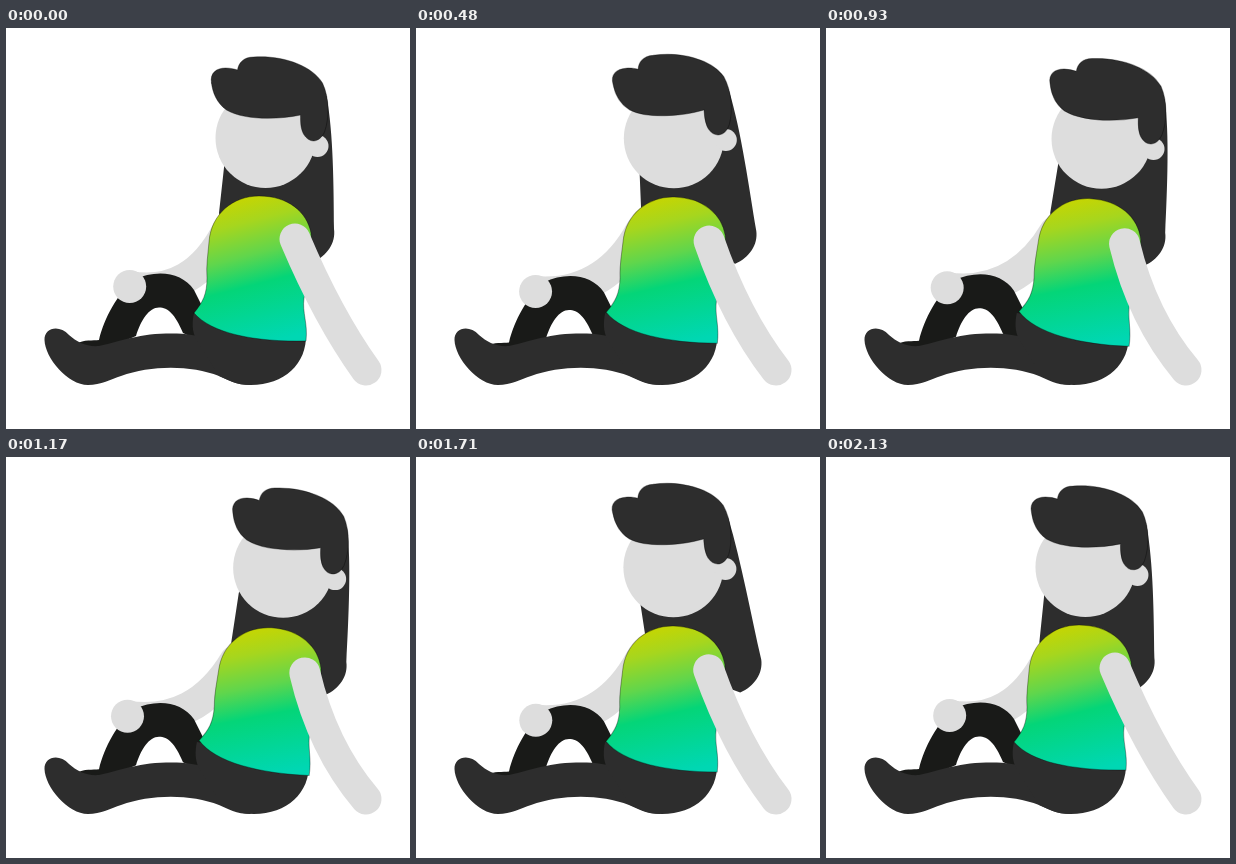
Animation of 404 by 401 pixels, one loop 2160 ms. Source, as an HTML page with a canvas:

```html
<!DOCTYPE html>
<html lang="en">
<head>
<meta charset="utf-8">
<title>Sitting figure</title>
<style>
html, body { margin: 0; width: 100%; height: 100%; overflow: hidden; background: #fff; }
canvas { display: block; width: 404px; height: 401px; }
</style>
</head>
<body>
<canvas id="stage"></canvas>
<script>
const W = 404, H = 401, LOOP = 2160, STEP = 30;
const HAIR = '#2d2d2d', SKIN = '#dddddd', FAR_LEG = '#191a18', EDGE = 'rgba(0,0,0,.35)';
const canvas = document.getElementById('stage');
const ctx = canvas.getContext('2d');
const dpr = window.devicePixelRatio || 1;
canvas.width = W * dpr;
canvas.height = H * dpr;

const rad = deg => deg * Math.PI / 180;

const farLeg = new Path2D('M70 316C78 311 87 313 93 312C98 290 112 265 128 252C150 241 176 244 188 262L199 284L192 312L177 305C169 286 162 279.500 153 279.500C143 279.500 135 292 130 308L95 323Z');
const nearLeg = new Path2D('M38.500 312C38 300 53 296 63 307C71 314 80 319 93 318C110 315 130 306 160 305.500C178 305 190 307 204 311L245 357C230 357 222 352 213 348C185 337 145 337 115 348C105 351 95 357 82 357C62 357 39 330 38.500 312Z');
const hips = new Path2D('M188 285L300 306C301 336 278 357 245 357C230 357 222 352 213 348L190 311C186 303 186 294 188 285Z');
const shirt = new Path2D('M188 285C197 274 201 266 201 250C200 238 202 226 203 214C205 186 227 168 253 168C282 168 301 184 305 205C307 230 303 255 298 270C296 285 302 295 300 313C250 314 206 306 188 285Z');
// Placed around the middle of the face.
const fringe = new Path2D('M-54 -55C-56 -65 -49 -70 -40 -70C-35 -70 -31 -69 -28 -68C-27 -75 -22 -81 -12 -81C16 -83 46 -73 57 -55C64 -40 64 -20 59 -6C54 5 44 6 38 -4C35 -10 35 -16 35 -23C11 -18 -22 -18 -39 -28C-49 -35 -53 -46 -54 -55Z');

const shirtFill = ctx.createLinearGradient(235, 168, 272, 312);
shirtFill.addColorStop(0, '#c8d500');
shirtFill.addColorStop(.18, '#a6d61e');
shirtFill.addColorStop(.4, '#60d64c');
shirtFill.addColorStop(.6, '#04d578');
shirtFill.addColorStop(1, '#00d7b3');

function shape(path, fill, edge) {
  ctx.fillStyle = fill;
  ctx.fill(path);
  if (edge) {
    ctx.strokeStyle = edge;
    ctx.lineWidth = 1;
    ctx.stroke(path);
  }
}

function disc(x, y, r, fill) {
  ctx.fillStyle = fill;
  ctx.beginPath();
  ctx.arc(x, y, r, 0, 2 * Math.PI);
  ctx.fill();
}

function limb(x0, y0, cx, cy, x1, y1, width) {
  ctx.strokeStyle = SKIN;
  ctx.lineWidth = width;
  ctx.lineCap = 'round';
  ctx.beginPath();
  ctx.moveTo(x0, y0);
  ctx.quadraticCurveTo(cx, cy, x1, y1);
  ctx.stroke();
}

function placed(x, y, angle, draw) {
  ctx.save();
  ctx.translate(x, y);
  ctx.rotate(angle);
  draw();
  ctx.restore();
}

function pose(t) {
  const slow = 2 * Math.PI * t / LOOP;
  const nod = Math.cos(2 * slow);
  const lean = (1 - Math.cos(slow)) / 2;
  const turn = 4.6 * (nod - 1) + 4.4 * lean;
  const headX = 259.5 + 14 * lean + 1.05 * turn;
  const headY = 110 + .8 * lean;
  return {
    lean, turn, headX, headY,
    // The fringe slides over the face as the head turns.
    capX: headX + .45 * turn,
    capY: headY + .43 * turn,
    capAngle: rad(.55 * turn),
    hairX: 339 - 5.5 * nod - 5.5 * Math.cos(slow) - 3 * Math.sin(slow),
    hairY: 233 + 4 * lean,
    handX: 122 + 1.7 * nod - 2 * lean,
    handY: 261 - 2.5 * nod + .4 * lean
  };
}

function drawHair(p) {
  const { hairX: x, hairY: y, headX, headY } = p;
  const sideX = headX + 68;
  ctx.fillStyle = HAIR;
  ctx.beginPath();
  placed(p.capX, p.capY, p.capAngle, () => {
    ctx.moveTo(0, -50);
    ctx.lineTo(61, -42);
  });
  ctx.bezierCurveTo(sideX, 105, (sideX + x) / 2, 160, x, y - 32);
  ctx.bezierCurveTo(x + 2, y - 18, x - 7, y - 5, x - 21, y + 1);
  ctx.lineTo(x - 65, y - 15);
  ctx.lineTo(x - 110, 203);
  ctx.lineTo(x - 115, 185);
  ctx.lineTo(headX - 41 - .9 * p.turn, headY + 25);
  ctx.closePath();
  ctx.fill();
}

function drawHead(p) {
  disc(p.headX, p.headY, 50, SKIN);
  disc(p.headX + 52, p.headY + 8 + .9 * p.turn, 11, SKIN);
  placed(p.capX, p.capY, p.capAngle, () => shape(fringe, HAIR, EDGE));
}

function draw(t) {
  const p = pose(t), k = p.lean;
  ctx.setTransform(dpr, 0, 0, dpr, 0, 0);
  ctx.fillStyle = '#fff';
  ctx.fillRect(0, 0, W, H);

  drawHair(p);
  drawHead(p);
  limb(p.handX, p.handY, 187 + 3 * k, 269, 221 + 8 * k, 203 + k, 31);
  placed(0, (p.handY - 258.5) / 2, 0, () => shape(farLeg, FAR_LEG));
  shape(nearLeg, HAIR);
  placed(3 * k, 0, 0, () => shape(hips, HAIR));
  placed(215, 365, rad(3.7 * k), () => {
    ctx.translate(-215, -365);
    shape(shirt, shirtFill, EDGE);
  });
  disc(p.handX, p.handY, 16.5, SKIN);
  limb(289 + 10 * k, 211 + 5 * k, 322 - 6 * k, 289 + k, 360, 342, 31);
}

const start = performance.now();
function tick() {
  const t = (performance.now() - start) % LOOP;
  draw(Math.floor(t / STEP) * STEP);
  requestAnimationFrame(tick);
}
tick();
</script>
</body>
</html>
```
